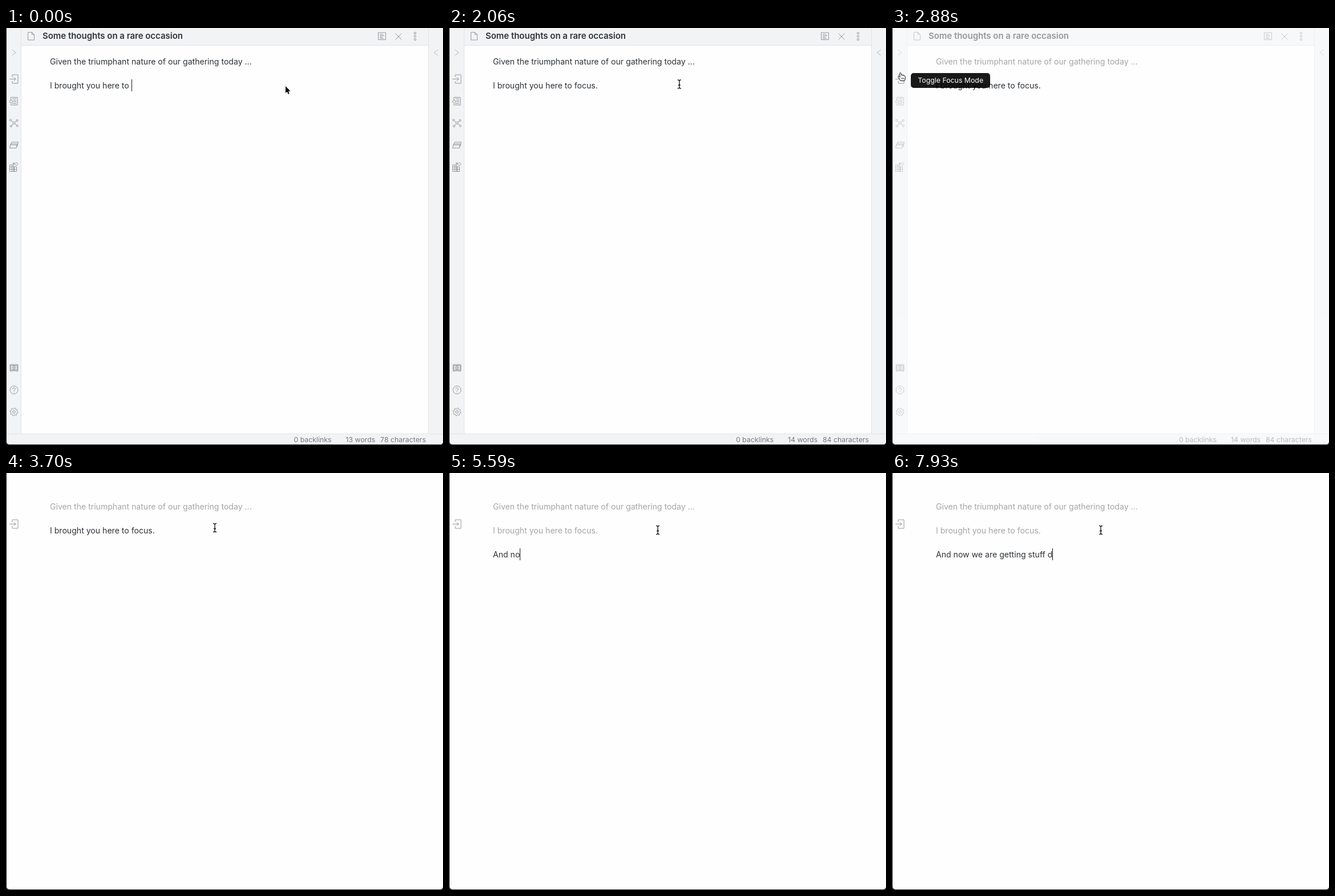
Write an HTML page that moves like this. It is 766 px wide and 731 px high and loops after 8 s.

```html
<!DOCTYPE html>
<html lang="en">
<head>
<meta charset="utf-8">
<title>Focus mode</title>
<style>
  html, body { margin: 0; width: 100%; height: 100%; overflow: hidden; background: #1b1b1d; }
  body { position: relative; font: 14.08px/21px Inter, sans-serif; color: #2e3338; }
  .win { position: absolute; left: 1px; top: 0; width: 765px; height: 730px; overflow: hidden;
         background: #fefefe; border-radius: 0 0 5px 5px; }
  .win > * { position: absolute; }
  .chrome { left: -1px; top: 0; width: 766px; height: 730px; }
  .chrome div { position: absolute; box-sizing: border-box; background: #f2f3f5; border: 0 solid #e1e3e6; }
  .chrome .ribbon { left: 0; top: 0; width: 27px; height: 711px; border-right-width: 1px; }
  .chrome .side { left: 740px; top: 0; width: 26px; height: 711px; border-left-width: 1px; }
  .chrome .head { left: 27px; top: 0; width: 713px; height: 31px; border-bottom-width: 1px; }
  .chrome .status { left: 0; top: 711px; width: 766px; height: 19px; border-top-width: 1px; padding-right: 30px;
    display: flex; justify-content: flex-end; font-size: 12.32px; line-height: 19px; color: #76797e; white-space: pre; }
  .status span + span { margin-left: 25px; }
  .status span + span + span { margin-left: 8.8px; }
  .title { position: absolute; left: 64px; top: 4px; font-weight: 600; font-size: 14.96px; white-space: pre; }
  .line { left: 76px; white-space: pre; }
  .dim { color: #a3a5a8; }
  .caret { width: 1px; height: 21px; background: #17181a; }
  .tip { left: 32px; top: 79px; height: 26px; padding: 0 12.32px; border-radius: 5px; background: rgba(0,0,0,.9);
         color: #fff; font-size: 12.32px; line-height: 26px; white-space: pre; }
  svg { position: absolute; left: 0; top: 0; overflow: visible; }
  .win > svg { left: -1px; }
  .ico { fill: none; stroke: #95979b; stroke-linejoin: round; }
  .pale { stroke: #b4b6b9; }
</style>
</head>
<body>
<div class="win">
  <div class="chrome" id="chrome">
    <div class="ribbon"></div><div class="side"></div><div class="head"></div>
    <div class="status"><span>0 backlinks</span><span id="words"></span><span id="chars"></span></div>
    <span class="title">Some thoughts on a rare occasion</span>
    <svg class="ico" width="766" height="730">
      <path class="pale" d="M10.5 38 17 43 10.5 48M757 38 750.5 43 757 48"/>
      <path d="M38.5 7.5h7l4 4v9.5h-11zM45.5 7.5v4h4"/>
      <path d="M652.5 8h13v12.500h-13zM655 11h6M655 13.500h8M655 16h5M655 18.200h7"/>
      <path d="M682.500 9.500l11 11M693.500 9.500l-11 11"/>
      <circle cx="717" cy="9" r="1.700"/><circle cx="717" cy="14.500" r="1.700"/><circle cx="717" cy="20" r="1.700"/>
      <path d="M8.500 126v-4.500h11.500v13.500h-11.500v-2M11 124h7M12.500 127h5.500M12.500 129.500h5.500M11 132.500h7"/>
      <circle cx="9" cy="129" r="2.500"/>
      <path d="M14 166.500 8.500 162M14 166.500l5.500-4M14 166.500l-5 5.500M14 166.500l5.500 4.500"/>
      <g fill="#f2f3f5"><circle cx="14" cy="166.500" r="2"/><circle cx="8" cy="161.500" r="1.600"/><circle cx="19.500" cy="162" r="1.600"/>
      <circle cx="8.800" cy="172" r="1.600"/><circle cx="19.700" cy="171.500" r="1.600"/></g>
      <path d="M9.500 202.500 10 200h11.500l-2 8h-1M8 203h11.500l-1.500 7.500H6.500zM7.500 205h11.500"/>
      <path d="M6.500 240h4v11.500h-4zM10.500 240h3v11.500h-3M6.500 243.500h12v8h-8M6.500 247.500h12M14.500 243.500v8M18 235.500l3 3-3 3-3-3zM12.500 236.500h2v2h-2z"/>
      <path d="M7 590h14v11H7zM8.500 591.500h11v8h-11zM8.500 601v1.800M19.500 601v1.800"/>
      <circle cx="14" cy="595.500" r="3"/><circle cx="14" cy="595.500" r="1.300"/>
      <circle cx="14" cy="634.500" r="7"/>
      <path d="M11.800 633c0-3 4.400-3 4.400 0 0 1.500-2.200 1.500-2.200 3.300M14 637.300v1.400"/>
      <circle cx="14" cy="673" r="2.300"/><path id="gear"/>
    </svg>
  </div>
  <svg class="ico" width="766" height="730"><path d="M11 86v-4h10v15H11v-4M6 89.500h11M13.500 86l3.500 3.500-3.500 3.500"/></svg>
  <div class="line" id="l1" style="top:48px">Given the triumphant nature of our gathering today ...</div>
  <div class="line" id="l2" style="top:90px"></div>
  <div class="line" id="l3" style="top:132px"></div>
  <div class="caret" id="caret"></div>
  <div class="tip" id="tip">Toggle Focus Mode</div>
  <svg width="766" height="730">
    <defs><path id="bar" d="M-3-7.500Q0-7.500 0-5.500 0-7.500 3-7.500M0-5.500V5.500M-3 7.500Q0 7.500 0 5.500 0 7.500 3 7.500M-2 1.500H2"/></defs>
    <g id="arrow"><path d="M0 0V12L2.800 9.400 4.700 13.800 6.700 12.900 4.800 8.700H8.600Z" stroke="#fff" stroke-width="1.600" paint-order="stroke"/></g>
    <g id="hand">
      <path d="M0 8.500C-1 7.200-2 6.200-2.800 6.800-3.800 7.500-2.800 8.700-2 9.800L1 14.500H8C8.800 12.500 9.600 11 9.400 7.500 9.300 6 7.700 5.700 7.300 6.500 7.100 5 5.500 4.900 5.100 5.700 4.800 4.400 3.300 4.300 2.900 5L1.800 1.300C1.300-.2-.8.2-.4 1.800Z" fill="#fff" stroke="#111"/>
      <path d="M3 9v3.200M5 9v3.200M7 9v3.200" stroke="#111" stroke-width=".7"/>
    </g>
    <g id="beam" fill="none">
      <use href="#bar" stroke="#fff" stroke-width="3"/><use href="#bar" stroke="#111" stroke-width="1.300"/>
    </g>
  </svg>
</div>
<script>
const $ = id => document.getElementById(id);
const LOOP = 8000, FOCUS = 2880;
const START = 'I brought you here to ', REST = 'focus.', NEXT = 'And now we are getting stuff d';

// n key presses spread evenly from a to b
const run = (a, b, n) => Array.from({ length: n }, (_, i) => a + (b - a) * i / (n - 1));
const keys2 = [750, 870, 1110, 1170, 1290, 1400];
const keys3 = [4940, 5060, 5230, 5410, 5500, 5590, 5650, ...run(5750, 5950, 3),
  ...run(6120, 6460, 6), ...run(6640, 7340, 9), ...run(7460, 7750, 4), 7930];
const typed = (keys, t) => keys.filter(k => k <= t).length;

const ease = x => x < 0 ? 0 : x > 1 ? 1 : x * x * (3 - 2 * x);
const lerp = (a, b, k) => a + (b - a) * k;

// pointer stops: [begin, end, x, y]
const moves = [[1880, 2540, 22, 83], [2540, 2700, 14, 78], [3360, 3700, 366, 96], [3700, 3870, 366, 100]];
function pointer(t) {
  let x = 490, y = 102;
  for (const [a, b, tx, ty] of moves) {
    const k = ease((t - a) / (b - a));
    x = lerp(x, tx, k);
    y = lerp(y, ty, k);
  }
  return { x, y, kind: t < 1880 ? 'arrow' : x < 28 ? 'hand' : x < 40 ? 'arrow' : 'beam' };
}

// line holding the caret and the caret's top, or null while it is hidden
function caretAt(t) {
  if (t < FOCUS) {
    const off = t >= 240 && t < 750 || t >= 1900 && t < 2400;
    return off ? null : [$('l2'), 90];
  }
  if (t < 3930) return null;
  if (t < 4470) return [$('l2'), 90];
  return [$('l3'), t < 4700 ? 111 : 132];
}

function tipOpacity(t) {
  if (t < 2540 || t >= 3400) return 0;
  return t < 2590 ? .27 : t < 2650 ? .55 : t < 2700 ? .85 : 1;
}

function draw(t) {
  const n = typed(keys2, t);
  $('l2').textContent = START + REST.slice(0, n);
  $('l3').textContent = NEXT.slice(0, typed(keys3, t));
  $('words').textContent = (n ? 14 : 13) + ' words';
  $('chars').textContent = 78 + n + ' characters';
  $('chrome').style.opacity = t < FOCUS ? 1 : t < 3000 ? .5 : 0;
  $('l1').classList.toggle('dim', t >= FOCUS);
  $('l2').classList.toggle('dim', t >= 4470);
  $('tip').style.opacity = tipOpacity(t);

  const c = caretAt(t), caret = $('caret');
  caret.style.display = c ? 'block' : 'none';
  if (c) {
    caret.style.left = Math.round(76 + c[0].getBoundingClientRect().width) + 'px';
    caret.style.top = c[1] + 'px';
  }

  const p = pointer(t);
  for (const id of ['arrow', 'hand', 'beam']) {
    $(id).style.display = id === p.kind ? '' : 'none';
    $(id).setAttribute('transform', `translate(${p.x} ${p.y})`);
  }
}

// eight-toothed gear outline
$('gear').setAttribute('d', 'M' + Array.from({ length: 32 }, (_, i) => {
  const r = i % 4 < 2 ? 7 : 5.3, a = (i + .5) * Math.PI / 16;
  return (14 + r * Math.cos(a)).toFixed(2) + ' ' + (673 + r * Math.sin(a)).toFixed(2);
}).join('L') + 'Z');

function tick() {
  draw(performance.now() % LOOP);
  requestAnimationFrame(tick);
}
tick();
</script>
</body>
</html>
```
